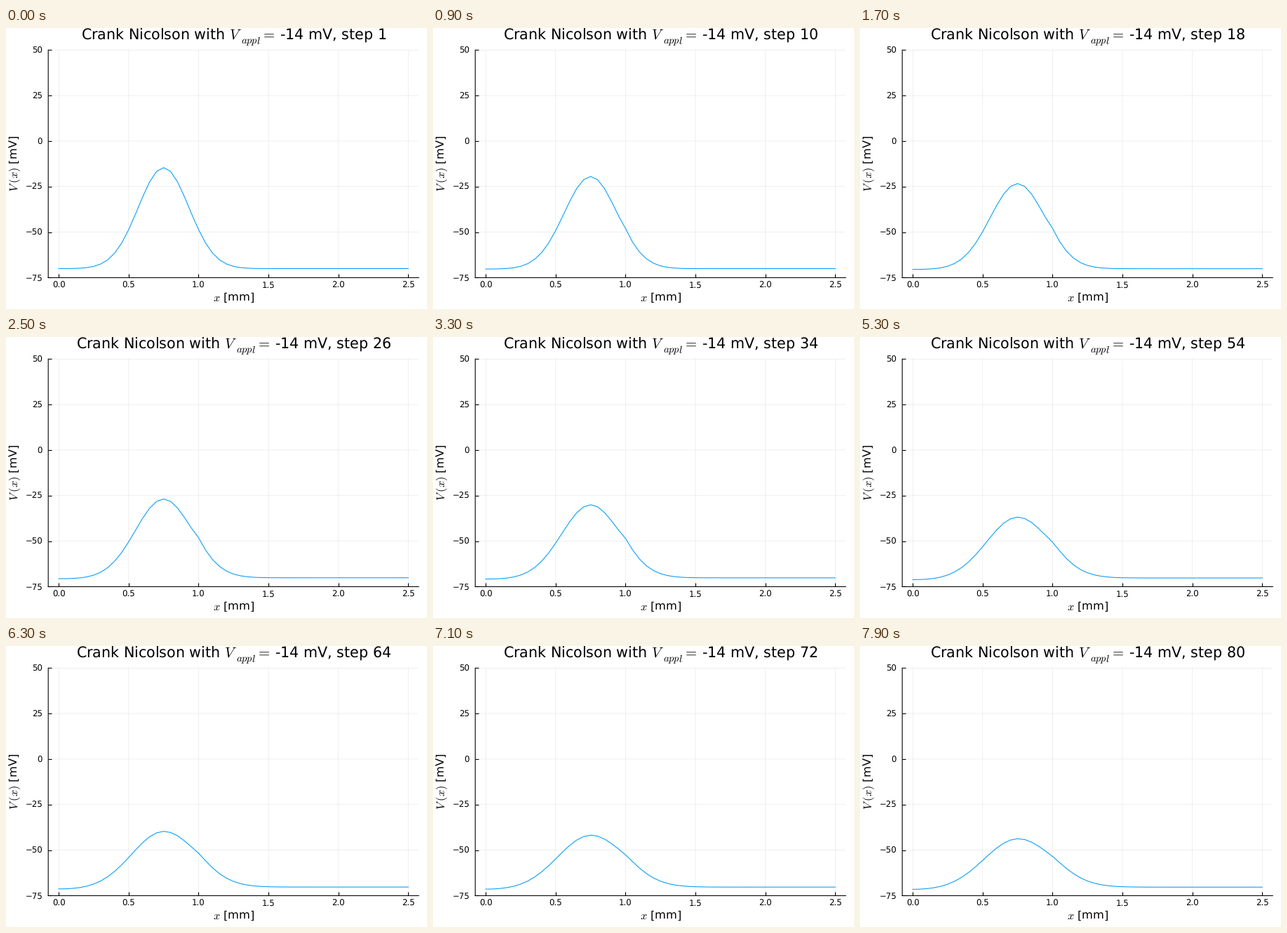
A matplotlib script for the animation above (8 s loop, 600 px wide and 400 px high).

```python
import numpy as np
import matplotlib.pyplot as plt
from matplotlib.animation import FuncAnimation

W, H, DPI = 600, 400, 100
STEPS, INTERVAL = 80, 100

# Cable equation, in mm, ms and mV
LAM, TAU, DT = 0.18, 2.0, 0.01
G_K, V_NA, V_K = 5.0, 56.0, -76.0
V_MEM, V_APPL, X0 = -70.0, -14.0, 0.75
N = 51
x = np.linspace(0, 2.5, N)
gated = x > 0.99


def sodium(v):
    """Sodium conductance relative to potassium, present only where gated."""
    g = 100 / (1 + np.exp(0.5 * (-40 - v))) + 0.2
    return np.where(gated, g / G_K, 0)


def solve():
    """Crank-Nicolson steps with sealed ends."""
    lap = np.diag(np.full(N, -2.0)) + np.eye(N, k=1) + np.eye(N, k=-1)
    lap[0, 1] = lap[-1, -2] = 2
    lap *= (LAM / (x[1] - x[0])) ** 2
    v = V_MEM + (V_APPL - V_MEM) * np.exp(-(x - X0) ** 2 / (2 * LAM ** 2))
    h, eye, out = DT / TAU, np.eye(N), []
    for _ in range(STEPS):
        g = sodium(v)
        a = lap - np.diag(g + 1)
        rhs = (eye + h / 2 * a) @ v + h * (g * V_NA + V_K)
        v = np.linalg.solve(eye - h / 2 * a, rhs)
        out.append(v)
    return out


def pt(px):
    return px * 72 / DPI


plt.rcParams.update({"font.family": "DejaVu Sans", "mathtext.fontset": "cm",
                     "text.hinting": "no_hinting", "path.snap": False})
curves = solve()

fig = plt.figure(figsize=(W / DPI, H / DPI), dpi=DPI, facecolor="white")
LEFT, RIGHT, TOP, BOTTOM = 60.2, 588.2, 31.3, 355.4
MID = (LEFT + RIGHT) / 2
TITLE, LABEL, TICK = 20.7, 16.2, 11.8

ax = fig.add_axes([LEFT / W, 1 - BOTTOM / H, (RIGHT - LEFT) / W, (BOTTOM - TOP) / H])
ax.set(xlim=(-0.075, 2.575), ylim=(-75, 50),
       xticks=np.arange(0, 2.6, 0.5), yticks=range(-75, 51, 25))
ax.spines[["top", "right"]].set_visible(False)
ax.spines[["left", "bottom"]].set_linewidth(pt(1.1))
ax.set_axisbelow(True)
ax.grid(color="black", alpha=0.1, lw=pt(0.6))
ax.tick_params(direction="in", length=pt(5), width=pt(1.1), labelsize=pt(TICK))
ax.tick_params(axis="x", pad=pt(5.5))
ax.tick_params(axis="y", pad=pt(8))


def label(px, py, s, size, ha="center", **kw):
    return fig.text(px / W, 1 - py / H, s, fontsize=pt(size), ha=ha,
                    va="baseline", **kw)


label(MID, 388.5, "$x$ [mm]", LABEL)
label(16.5, 193, r"$V\hspace{0.25}(x)$ [mV]", LABEL,
      rotation=90, rotation_mode="anchor")
title = label(MID, 17, "", TITLE)
sub = label(MID, 21.8, "$appl$", 0.7 * TITLE, ha="left")
line, = ax.plot(x, curves[0], color="#009AFA", lw=pt(1.05))

DIGIT = 0.636 * TITLE


def draw(i):
    step = str(i + 1)
    line.set_ydata(curves[i])
    # The gap after V holds the lowered subscript
    title.set_text(r"Crank Nicolson with $V\hspace{1.82}=\hspace{0.2}$"
                   f"-14 mV, step {step}")
    sub.set_x((MID + 17 - DIGIT / 2 * len(step)) / W)
    return line, title, sub


anim = FuncAnimation(fig, draw, frames=STEPS, interval=INTERVAL, repeat=True)
plt.show()
```
